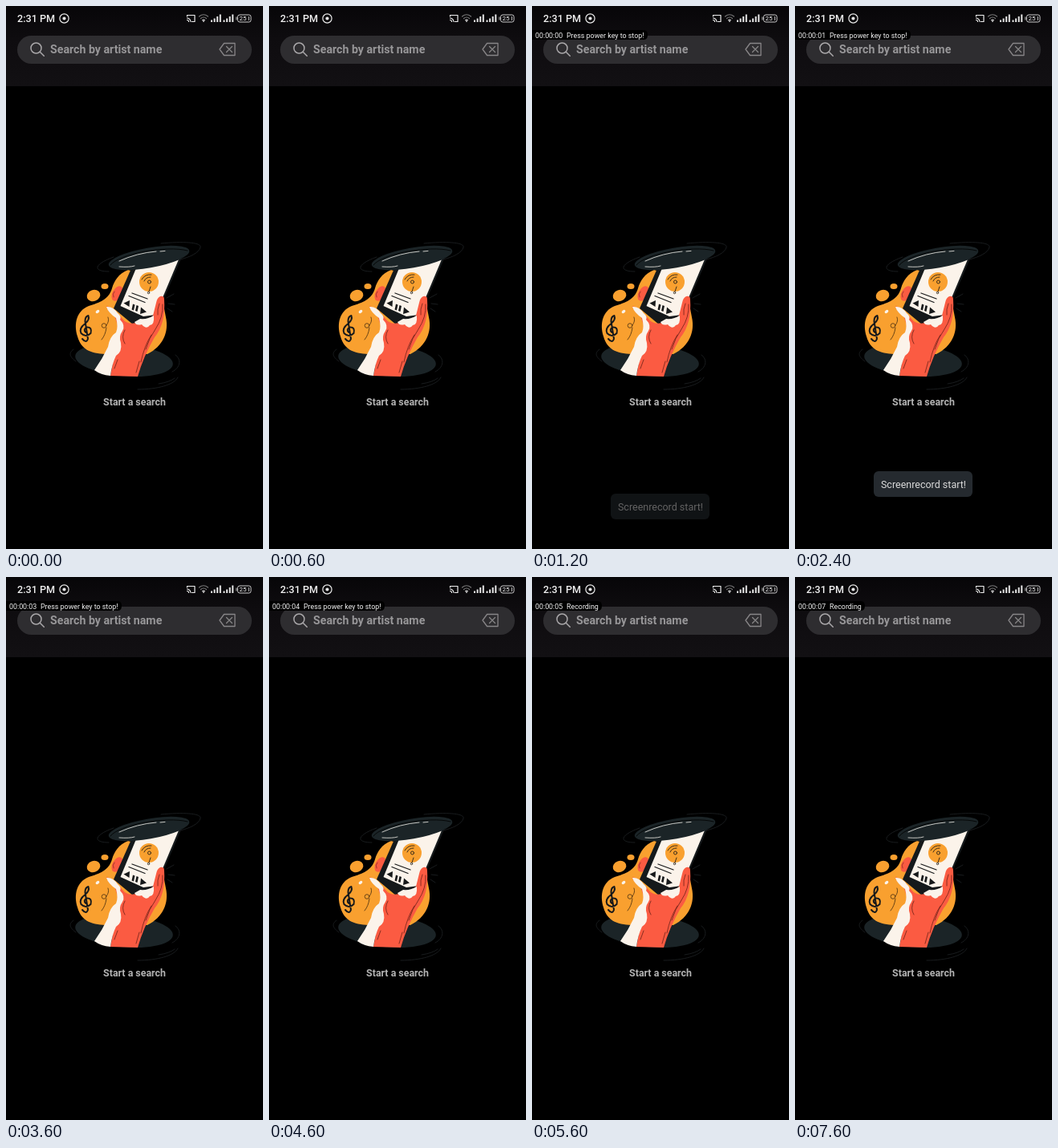
Write an HTML page that moves like this. It is 320 px wide and 677 px high and loops after 8 s.

```html
<!DOCTYPE html>
<html lang="en">
<head>
<meta charset="utf-8">
<title>Artist search</title>
<style>
html, body { margin: 0; width: 100%; height: 100%; overflow: hidden; background: #000; }
svg { display: block; width: 100vw; height: 100vh; }
text { font-family: Roboto, sans-serif; white-space: pre; }
.line { fill: none; stroke-linecap: round; stroke-linejoin: round; }
</style>
</head>
<body>
<svg viewBox="0 0 320 677" preserveAspectRatio="none">
  <defs>
    <linearGradient id="shade" x1="0" y1="0" x2="0" y2="1">
      <stop offset="0" stop-color="#070608"/><stop offset=".4" stop-color="#0e0c0f"/><stop offset="1" stop-color="#121013"/>
    </linearGradient>
    <g id="bars" fill="#e4e4e4">
      <rect y="7" width="2" height="2.5"/><rect x="3.6" y="5" width="2" height="4.5"/>
      <rect x="7.2" y="2.5" width="2" height="7"/><rect x="10.8" width="2" height="9.5"/>
    </g>
    <g id="status">
      <text x="14" y="20" font-size="12.6" font-weight="500" fill="#f2f2f2">2:31 PM</text>
      <g class="line" stroke="#777" stroke-width="1.2">
        <path d="M240.5 13q5.5-4.5 11 0M242.5 15.5q3.5-3 7 0"/><path d="M244.5 17.7q1.5-1.2 3 0" stroke="#ccc"/>
      </g>
      <circle cx="246" cy="19" r="1" fill="#ccc"/>
      <use href="#bars" x="255" y="10.5"/><use href="#bars" x="270.5" y="10.5"/>
      <rect x="288.5" y="11" width="16.5" height="9" rx="2.5" fill="none" stroke="#ccc"/>
      <path d="M286.9 13.5v4M302.3 13v5" stroke="#ccc"/>
      <text x="290.5" y="18.4" font-size="8" fill="#eee">25</text>
    </g>
    <g id="page">
      <rect width="320" height="677"/>
      <rect id="head" width="320" height="100" fill="url(#shade)"/>
      <rect x="14" y="37" width="292" height="35" rx="17.5" fill="#2e2d30"/>
      <g class="line" stroke="#aaa8aa" stroke-width="1.5">
        <circle cx="37.5" cy="52.5" r="6.5"/><path d="M42.3 57.3l5 5"/>
      </g>
      <text x="55" y="58.5" font-size="14.2" font-weight="700" fill="#979698">Search by artist name</text>
      <path class="line" stroke="#888688" stroke-width="1.3" d="M266 54l5.5-7.5h13.5v15h-13.5zM274.5 50.5l7 7m0-7l-7 7"/>
      <g id="art">
        <g class="line" stroke="#202426" stroke-width=".8">
          <path d="M128 331c-22 0-17-10 6-18M193 296c30-3 51-1 49 5-2 7-13 12-25 15"/>
          <path d="M84 428c-7 5-4 10 3 15M211 435c8 6 6 16-4 21M214 463c-4 9-25 15-50 15M190 471q14-2 20-7M200 364l9-5M202 371l8 1M201 377l6 4"/>
        </g>
        <ellipse cx="147" cy="441.5" rx="61" ry="20" transform="rotate(5 147 441.5)" fill="#1b2427"/>
        <path fill="#f9a02f" d="M152 329C140 334 135 342 132 352C128 366 116 370 103 374C88 380 84 396 89 412C94 430 108 434 128 434H176C196 424 203 406 199 388L190 340z"/>
        <ellipse cx="109" cy="361" rx="8.5" ry="7" transform="rotate(-20 109 361)" fill="#f9a02f"/>
        <ellipse cx="123" cy="349.5" rx="4.5" ry="3.5" fill="#f9a02f"/>
        <ellipse cx="114" cy="381" rx="2.6" ry="1.7" transform="rotate(-35 114 381)" fill="#fbf3ea"/>
        <path class="line" stroke="#17191a" stroke-width="2" d="M95 415q5 6 7 0L98.5 393q0-6 4-7q2 5-4 10q-8 6-5 12q6 6 12 0q2-8-5-7.5q-5 3-1 6.5"/>
        <g class="line" stroke="#5c3c14" stroke-width=".9">
          <circle cx="122" cy="398.5" r="2.8"/><path d="M125 398q4-5 2-10M125 401q-1 9-6 15"/>
        </g>
        <ellipse cx="138.5" cy="358.5" rx="6" ry="10" transform="rotate(28 138.5 358.5)" fill="#fb5b42"/>
        <path d="M135 356q-3 3-1 7" class="line" stroke="#7c2a1e" stroke-width=".7"/>
        <path fill="#15191b" d="M157 325L134 377L158 397L186 390L218 315z"/>
        <path fill="#fbf3ea" d="M162 327L142.5 374L171 387L186 385L215 316z"/>
        <circle cx="178" cy="344" r="12" fill="#f9a02f"/>
        <g class="line" stroke="#2a2218" stroke-width=".9">
          <circle cx="178.5" cy="344" r="2"/><path d="M169 341q4-7 12-6M172 343q2-5 8-5M180 350l-2 6"/><circle cx="177.5" cy="357.5" r="1.2"/>
        </g>
        <path class="line" stroke="#17191a" stroke-width="1.3" d="M157 358l19 7M153 361.5l20 8"/>
        <path fill="#17191a" d="M146.5 370.5l7.5-3.5-.5 8zM168 375.5l7 6-8 2.5zM158 371.5l2.5 1-1.5 7-2.5-1zM162.5 373l2.5 1-1.5 7-2.5-1z"/>
        <ellipse cx="178" cy="314" rx="51" ry="12.5" transform="rotate(-10 178 314)" fill="#1b2427"/>
        <path class="line" stroke="#050707" d="M130 323c10-14 70-25 96-18"/>
        <path class="line" stroke="#d9d7d2" stroke-width=".9" d="M141 325q13 1 19-1M141 318q22-10 46-12M192 306l6-.6"/>
        <path fill="#fb5b42" d="M197 366q0-5-5-4-4 2-5 8L183 386Q177 393 166 394Q152 399 145 390Q138 382 134 379Q130 375 125 374Q127 382 135 386L139 398L137 414L134 440L130 461L164 462Q171 437 185 413Q199 396 197 366z"/>
        <path fill="#fbf3ea" d="M110 454Q120 440 127 425Q129 412 137 407Q140 400 137 389Q127 382 125 375Q133 374 139 383Q144 387 142 391Q149 398 145 405Q140 412 143 420Q145 431 137 436Q132 446 130 461Q118 460 110 454z"/>
        <path fill="#fbf3ea" d="M160 394Q162 399 169 397Q175 404 179 398Q185 398 184 386Q176 391 167 390z"/>
        <path class="line" stroke="#6d2118" stroke-width=".8" d="M195 372q1 16-9 31-8 11-12 25M181 410q-9 14-13 34M191 371q-3 7-2 14M148 404q-5 9 0 17M139 441l-4 11M166 443l-4 14"/>
        <text x="160" y="498" font-size="12.4" font-weight="700" text-anchor="middle" fill="#b2b2b2">Start a search</text>
      </g>
    </g>
  </defs>

  <use href="#page"/>
  <use href="#status"/>
  <g class="line" stroke="#eee" stroke-width="1.2">
    <circle cx="72.5" cy="15.5" r="5.6"/><circle cx="72.5" cy="15.5" r="1.5" fill="#eee"/>
    <path d="M225.5 13v-1.5h9.5v8h-3.5M225.5 15q4 .5 4.5 4.5M225.5 17.5q2 0 2 2"/>
  </g>

  <g id="shot">
    <rect x="4" y="31" width="312" height="638" fill="#fff"/>
    <g transform="translate(13 40) scale(.919 .916)"><use href="#page"/><use href="#status"/></g>
    <g fill="#1b80b0">
      <path d="M267 238q2-2 2-6 0-5 4-6 0-2 1-2t1 2q4 1 4 6 0 4 3 6v1h-15zM272 240h4q-2 3-4 0z"/>
      <circle cx="274" cy="284.5" r="5.5"/><rect x="272.5" y="284" width="3" height="108" rx="1.5"/>
    </g>
    <g class="line" stroke="#1b80b0" stroke-width="1.7">
      <circle cx="271.5" cy="419.5" r="3"/><path d="M274.5 419v-10q0 3 6 6"/>
    </g>
    <rect x="248" y="441.5" width="52" height="52" rx="5" fill="#403e41"/>
    <path class="line" stroke="#1b80b0" stroke-width="1.3" d="M269.5 464.5h4m3 0h2.5M269.5 468h2m3 0h4.5M269.5 471.5h4m3 0h2.5M276 463v3M272 466.500v3M274 470v3"/>
  </g>

  <g id="timer">
    <path id="tag" fill="#000"/>
    <g font-size="8.9" fill="#f2f2f2">
      <text id="clock" x="4" y="39.5"></text>
      <text id="note" x="43" y="39.5"></text>
    </g>
  </g>
  <g id="toast">
    <rect x="98" y="580" width="123" height="32" rx="6" fill="#252a2f"/>
    <text x="160" y="601" font-size="12.5" text-anchor="middle" fill="#dadada">Screenrecord start!</text>
  </g>
</svg>
<script>
const $ = id => document.getElementById(id);
const LOOP = 8000, STEP = 200;
const ticks = [1400, 2600, 3600, 4600, 5600, 6600, 7600];
const show = (id, on) => $(id).style.display = on ? '' : 'none';

function draw(t) {
  const scrolled = t >= 5000 && t < 5600;
  const recording = t >= 5600;
  show('head', !scrolled);
  $('art').setAttribute('transform', `translate(0 ${scrolled ? -50 : 0})`);
  show('shot', t >= 800 && t < 1000);

  show('timer', t >= 1000);
  $('clock').textContent = '00:00:0' + ticks.filter(x => t >= x).length;
  $('note').textContent = recording ? 'Recording' : 'Press power key to stop!';
  $('tag').setAttribute('d', `M0 30H${recording ? 82 : 139}q5 0 5 6t-5 6H0z`);

  // The toast rises while fading in, then fades out in place.
  const entering = t < 1400;
  show('toast', t >= 1200 && t < 2800);
  $('toast').setAttribute('opacity', entering || t >= 2600 ? .45 : 1);
  $('toast').setAttribute('transform', `translate(0 ${entering ? 28 : 0})`);
}

const start = performance.now();
function tick() {
  const t = (performance.now() - start) % LOOP;
  draw(Math.floor(t / STEP) * STEP);
  requestAnimationFrame(tick);
}
tick();
</script>
</body>
</html>
```
